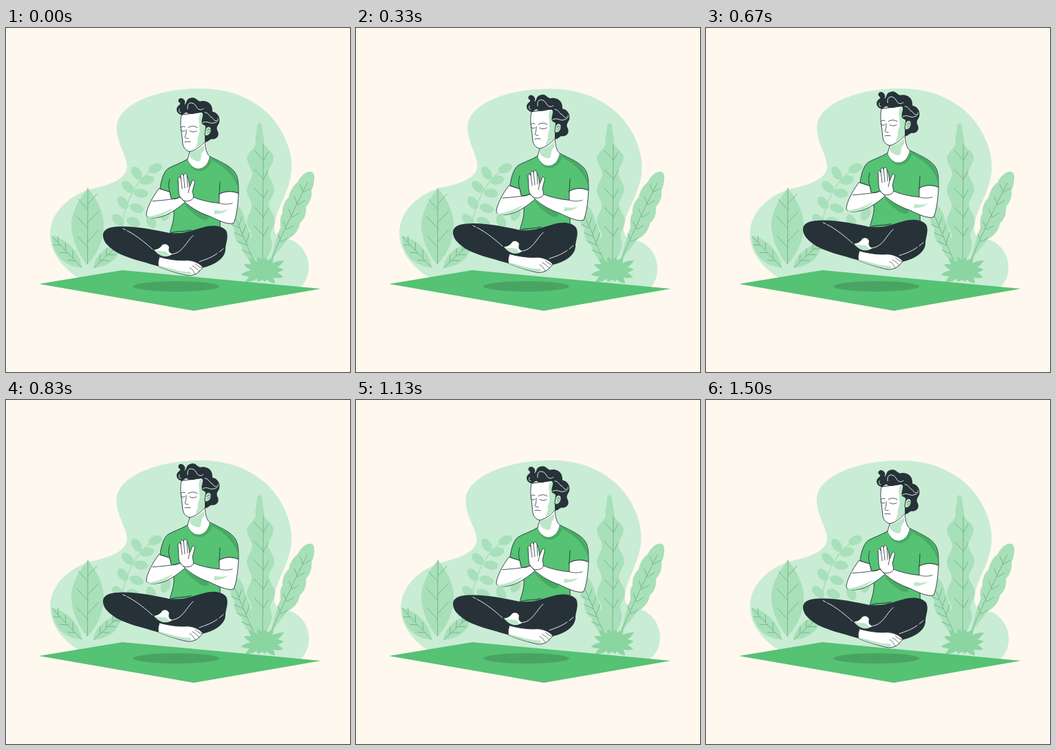
Write an HTML page with a canvas that moves like this. It is 500x500 px and loops after 1540 ms.

```html
<!DOCTYPE html>
<html lang="en">
<head>
<meta charset="utf-8">
<title>Floating meditation</title>
<style>
html, body { margin: 0; width: 100%; height: 100%; overflow: hidden; background: #fff8ee; }
canvas { display: block; width: 500px; height: 500px; }
</style>
</head>
<body>
<canvas id="stage" width="500" height="500"></canvas>
<script>
const ctx = document.getElementById('stage').getContext('2d');
const LOOP = 1540, CYCLE = 1500, RATE = 24 / 1000;
const C = {
  bg: '#fff8ee', blob: '#c9ecd5', leaf: '#a8e0b9', vein: '#7ab38d', tuft: '#8bd5a1',
  mat: '#55c274', shadow: '#49a463', shirt: '#55c274', fold: '#47aa63',
  dark: '#263238', skin: '#ffffff', shade: '#bbe7c8'
};
const cache = {};
const path = d => cache[d] || (cache[d] = new Path2D(d));

function fill(d, color) {
  ctx.fillStyle = color;
  ctx.fill(path(d));
}
function line(d, color = C.dark, width = 0.9) {
  ctx.strokeStyle = color;
  ctx.lineWidth = width;
  ctx.stroke(path(d));
}
function shape(d, color, width = 0.9) {
  fill(d, color);
  line(d, C.dark, width);
}
function oval(x, y, rx, ry, degrees, color) {
  ctx.fillStyle = color;
  ctx.beginPath();
  ctx.ellipse(x, y, rx, ry, degrees * Math.PI / 180, 0, 2 * Math.PI);
  ctx.fill();
}
function blade(x, y, degrees, reach, width, color) {
  ctx.save();
  ctx.translate(x, y);
  ctx.rotate(degrees * Math.PI / 180);
  ctx.fillStyle = color;
  ctx.beginPath();
  ctx.moveTo(0, 0);
  ctx.quadraticCurveTo(reach * 0.55, -width, reach, 0);
  ctx.quadraticCurveTo(reach * 0.55, width, 0, 0);
  ctx.fill();
  ctx.restore();
}

// Midrib between two points, with side veins angled towards the tip
function veins(x0, y0, x1, y1, count, length, spread = 0.75) {
  const angle = Math.atan2(y1 - y0, x1 - x0);
  ctx.strokeStyle = C.vein;
  ctx.lineWidth = 1;
  ctx.beginPath();
  ctx.moveTo(x0, y0);
  ctx.lineTo(x1, y1);
  for (let i = 0; i < count; i++) {
    for (const side of [-1, 1]) {
      const u = 0.22 + 0.5 * (i + (side > 0 ? 0.3 : 0)) / Math.max(1, count - 1);
      const x = x0 + (x1 - x0) * u, y = y0 + (y1 - y0) * u;
      const reach = length * (1 - 0.5 * Math.abs(u - 0.4));
      ctx.moveTo(x, y);
      ctx.lineTo(x + reach * Math.cos(angle + side * spread), y + reach * Math.sin(angle + side * spread));
    }
  }
  ctx.stroke();
}

function drawBlob(degrees) {
  ctx.save();
  ctx.translate(251, 235);
  ctx.rotate(degrees * Math.PI / 180);
  ctx.translate(-251, -235);
  fill(`M161 144C162 111 220 88 281 88C338 87 381 114 401 151C411 170 416 187 415 206
    C413 239 391 264 390 289C389 302 400 306 411 307C427 311 440 328 440 347
    C440 361 435 371 425 379L300 385L115 368C87 355 64 329 64 300
    C64 267 94 241 128 233C155 227 176 218 176 201C175 184 160 166 161 144Z`, C.blob);
  ctx.restore();
}

function drawLeftPlants() {
  fill('M119 233C108 246 95 266 95 287C96 310 107 331 118 344C131 331 142 310 142 287C142 266 130 246 119 233Z', C.leaf);
  veins(118.5, 343, 119, 233, 3, 24);
  fill('M67 302C66 323 80 347 110 348C108 329 92 308 67 302Z', C.leaf);
  veins(110, 348, 67, 303, 3, 12);
  fill('M127 349C129 332 142 319 166 311C169 332 152 346 127 349Z', C.leaf);
  veins(128, 348, 165, 314, 3, 12);

  line('M220 203Q179 222 167 292', C.leaf, 1.5);
  const sprig = [[217, 204, -22], [190, 211, 58], [205, 221, -14], [177, 231, 45], [196, 240, 8],
    [170, 254, 52], [190, 262, 20], [163, 279, 45], [185, 282, 25], [232, 270, 115], [211, 281, 65]];
  for (const [x, y, a] of sprig) oval(x, y, 10.5, 6.5, a, C.leaf);
}

function drawRightPlants() {
  fill('M326 262C324 275 326 286 332 291C330 302 335 312 343 317C344 328 353 338 365 347C359 330 363 315 355 305C355 294 349 287 347 278C346 270 342 263 336 258Z', C.leaf);
  veins(363, 345, 331, 270, 4, 16);
  fill(`M365 142C366 137 371 137 372 142C373 156 376 162 375 168C378 176 390 181 389 189
    C388 199 381 204 381 211C382 219 390 226 390 235C389 244 382 250 382 257
    C383 265 391 272 391 281C390 290 384 295 384 302C385 308 388 312 386 319C383 330 377 339 372 347
    C362 336 353 325 352 317C352 310 357 306 357 301C357 294 350 289 350 280
    C351 271 358 265 357 257C356 249 350 244 350 235C351 226 358 219 358 211
    C357 204 351 198 350 189C351 180 363 175 363 167C361 160 365 153 365 142Z`, C.leaf);
  line('M374 169L373 345', C.vein, 1);
  for (let i = 0; i < 5; i++) {
    const y = 192 + i * 27.5;
    line(`M361 ${y - 14}L374 ${y}M374 ${y + 1}L381 ${y - 12}`, C.vein, 1);
  }
  fill(`M446 210C440 206 430 212 424 224C415 231 412 240 411 246C404 252 401 262 402 269
    C397 276 399 284 399 290C393 303 389 324 382 345C391 328 404 315 409 307
    C418 303 426 294 427 284C434 278 437 269 436 260C443 252 445 244 444 236C448 228 450 214 446 210Z`, C.leaf);
  line('M438 225Q404 292 382 345', C.vein, 1);
  for (let i = 0; i < 5; i++) {
    const x = 433 - i * 8, y = 236 + i * 18;
    line(`M${x - 6} ${y - 9}L${x - 1} ${y + 3}L${x + 9} ${y - 3}`, C.vein, 1);
  }
  const blades = [[-160, 30], [-138, 29], [-110, 23], [-80, 21], [-55, 25], [-28, 34], [-6, 30],
    [16, 30], [45, 24], [80, 15], [120, 17], [150, 30], [172, 33]];
  for (const [degrees, reach] of blades) blade(374, 354, degrees, reach, 9, C.tuft);
}

function drawMat() {
  fill('M48 372L169 352L457.5 379L273 411Z', C.mat);
  oval(247.5, 375.5, 62.5, 7.5, 0, C.shadow);
}

function drawHead() {
  fill('M267 172L264 190C270 209 292 209 296 186C292 182 290 170 289 160Z', C.skin);
  fill('M267 179C276 179 284 174 288 169L288 177C282 182 285 187 282 193C275 194 269 190 267 185Z', C.shade);
  line('M267 179L264 190M289 164C290 174 291 182 296 186');
  shape('M255 126C253 134 254 144 255 150L257 168C258 174 262 178 267 179C277 177 285 170 291 162L293 140L285 122Z', C.skin);
  fill('M282 124C278 132 282 137 281 145C283 154 277 156 279 164L275 175C282 171 288 165 291 161L292 136L286 124Z', C.shade);
  fill(`M256 126C248 125 246 117 250 113C254 110 254 109 251 107C249 103 253 100 257 102
    C261 105 261 108 259 111C263 110 261 102 269 101C276 99 278 106 283 106
    C290 104 301 108 300 121C307 122 312 129 310 137C307 143 305 144 308 150
    C311 158 304 162 298 161C294 163 293 166 289 165L289 154L290 142L285 139C283 133 287 129 286 123
    C279 121 272 126 265 124C262 120 260 123 256 126Z`, C.dark);
  for (const strand of ['M252 117C251 121 252 123 254 122', 'M264 117C263 109 267 107 272 109C277 111 277 118 282 118C286 119 286 115 287 117',
    'M289 122C295 123 295 127 298 129C302 130 301 135 306 134', 'M286 137C293 133 297 140 303 137C307 136 309 134 308 131'])
    line(strand, '#fff', 0.9);
  shape('M290 147C292 141 298 142 298 147C298 153 293 158 289 155Z', C.shade, 0.8);
  line('M292 149C294 145 296 146 296 148M293 152L295 150', C.dark, 0.7);
  line('M262 147C262 151 262 154 260 158C261 160 263 160 265 160M260 165Q264 164 268 165M254 148Q257 151 260 149M267 149Q272 152 277 149M254 144Q257 141 260 143M265 144Q271 140 278 144', C.dark, 0.8);
}

function drawTorso() {
  shape(`M264 190C254 196 243 199 235 204C228 210 225 224 224 233L238 238
    C241 247 240 256 244 266C245 279 240 289 238 298L312 298C310 283 312 260 310 241C318 236 330 236 338 240
    C338 225 338 215 331 207C323 198 308 192 296 186C292 209 270 209 264 190Z`, C.shirt);
  fill('M264 192C270 212 291 213 299 193L296 187C292 209 270 209 264 190Z', C.fold);
  fill('M298 188C320 196 337 206 338 236C334 218 322 203 298 191Z', C.fold);
  fill('M258 253C270 263 284 268 294 273C296 277 292 279 286 278C276 273 264 263 258 253Z', C.fold);
  line('M238 238C236 230 236 225 238 219M310 241L311 223', C.dark, 0.85);
}

function drawLegs() {
  fill(`M141 301C141 291 153 288 166 288C189 287 217 293 240 298C252 300 270 294 284 290
    C298 285 314 286 320 294C324 302 320 311 319 319C320 333 305 344 285 348L262 346L222 346
    C199 339 171 333 157 323C147 316 141 309 141 301Z`, C.dark);
  line('M240 297C249 294 259 296 269 293', C.dark, 1);
  fill('M215 322C222 321 225 318 227 315C231 312 236 314 237 318C236 323 236 326 242 328C236 333 225 333 215 322Z', C.skin);
  fill('M216 323L231 324C235 325 235 328 238 330C230 334 222 330 216 323Z', C.shade);
  line('M170 291L174 293M176 294C190 301 204 313 213 321M242 328C257 326 262 310 272 301M281 339C290 336 299 333 307 327M310 325L316 320', '#fff', 0.9);
  shape(`M223 332C235 336 253 338 263 337C271 337 281 341 285 346C287 350 281 351 281 353
    C278 357 270 360 263 359C249 356 233 351 222 346C220 341 222 337 223 332Z`, C.skin);
  fill('M222 345C236 347 250 354 268 354C271 356 268 358 264 358C250 356 233 351 222 346Z', C.shade);
  line('M267 348C271 349 273 354 275 357M271 345C275 347 278 350 281 353M275 342Q280 347 284 348', C.dark, 0.7);
}

function drawArms() {
  shape(`M222 233C213 245 204 262 204 271C206 278 223 276 235 270C247 264 255 257 261 252
    L252 245C247 249 242 248 240 247L238 238Z`, C.skin);
  fill('M206 274C220 271 230 268 242 261C237 270 217 278 206 275Z', C.shade);
  line('M213 251C225 250 241 249 252 246', C.dark, 0.85);
  shape(`M310 241L310 254C298 253 283 250 272 245L256 248C263 257 280 268 296 273
    C308 279 323 286 331 283C335 273 337 259 338 240C330 236 318 236 310 241Z`, C.skin);
  fill('M303 264C311 266 318 265 323 263C318 268 310 270 302 270Z', C.shade);
  line('M310 254C316 256 324 256 329 254', C.dark, 0.75);
  shape(`M250 219C250 215 253 215 254 218L254 214C255 211 258 211 258 214
    C258 210 263 210 263 214L265 219L267 230C269 226 270 223 271 221C273 219 275 222 274 225
    L271 237C272 241 273 244 272 247C269 251 262 252 258 250C253 246 251 242 251 237Z`, C.skin);
  line('M254 217L256 233M258 213L260 232M263 215L264 231M267 230L265 239', C.dark, 0.8);
}

// Triangle wave: 0 at the start, 1 halfway, 0 at the end
const triangle = u => 1 - Math.abs(1 - 2 * (((u % 1) + 1) % 1));

function draw(now) {
  // The motion advances in 24 steps a second and rests on its last step
  const step = Math.floor((now % LOOP + 5) * RATE);
  const u = Math.min(step / RATE / CYCLE, 1);
  ctx.fillStyle = C.bg;
  ctx.fillRect(0, 0, 500, 500);
  ctx.lineCap = ctx.lineJoin = 'round';
  drawBlob(2 * triangle(u + 0.25) - 1);
  drawLeftPlants();
  drawRightPlants();
  drawMat();
  ctx.save();
  ctx.translate(0, 0.6 - 10 * triangle(u));
  drawTorso();
  drawHead();
  drawLegs();
  drawArms();
  ctx.restore();
}

const start = performance.now();
function tick() {
  draw(performance.now() - start);
  requestAnimationFrame(tick);
}
tick();
</script>
</body>
</html>
```
